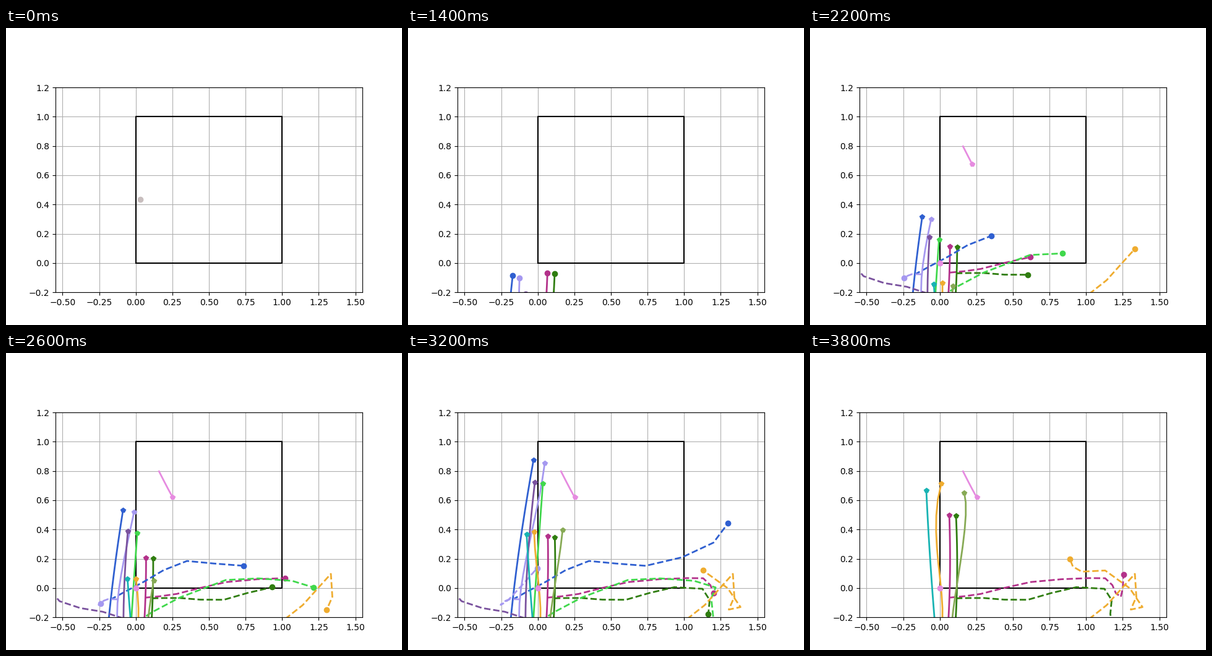
These frames come from a looping animation (640 by 480 pixels, 4000 ms). A matplotlib script:

```python
import numpy as np
import matplotlib.pyplot as plt
from matplotlib.animation import FuncAnimation

FRAMES, STEP_MS = 20, 200
SPLIT = 7  # last observed step; predictions branch off here


def curve(keys, steps):
    """Polynomial through (step, x, y) keys, at rest after the last one."""
    t, *xy = np.array(keys, dtype=float).T
    s = np.minimum(steps, t[-1]) - t[0]
    return np.column_stack([np.polyval(np.polyfit(t - t[0], v, len(t) - 1), s)
                            for v in xy])


def spline(keys, steps):
    """Smooth Hermite path through (step, x, y) keys."""
    keys = np.array(keys, dtype=float)
    t, p = keys[:, 0], keys[:, 1:]
    slope = np.gradient(p, t, axis=0)
    i = np.clip(np.searchsorted(t, steps, side="right") - 1, 0, len(t) - 2)
    h = (t[i + 1] - t[i])[:, None]
    u = np.clip((steps - t[i])[:, None] / h, 0, 1)
    ease = u * u * (3 - 2 * u)
    return (p[i] + (p[i + 1] - p[i]) * ease
            + h * u * (1 - u) * (slope[i] * (1 - u) - slope[i + 1] * u))


class Walker:
    """A solid walked path, plus a dashed predicted one after SPLIT."""

    def __init__(self, ax, color, keys, guess=None, last=FRAMES - 1):
        self.first, self.last = keys[0][0], last
        self.path = curve(keys, np.arange(self.first, last + 1))
        self.guess = spline(guess, np.arange(SPLIT, last + 1)) if guess else None
        self.line, = ax.plot([], [], "-", color=color, lw=2)
        self.dash, = ax.plot([], [], "--", color=color, lw=2)
        self.head, = ax.plot([], [], "p", color=color)
        self.dot, = ax.plot([], [], "o", color=color)
        self.artists = [self.line, self.dash, self.head, self.dot]

    def show(self, step):
        for artist in self.artists:
            artist.set_data([], [])
        if not self.first <= step <= self.last:
            return
        path = self.path[:step - self.first + 1]
        self.line.set_data(*path.T)
        tip = self.dot if step <= SPLIT else self.head
        tip.set_data(*path[-1:].T)
        if step > SPLIT and self.guess is not None:
            guess = self.guess[:step - SPLIT + 1]
            self.dash.set_data(*guess.T)
            self.dot.set_data(*guess[-1:].T)


fig, ax = plt.subplots(figsize=(6.4, 4.8), dpi=100)
fig.subplots_adjust(left=0.125, right=0.9, bottom=0.11, top=0.8)
half = 0.7 * 496 / 331.2  # equal scale on both axes
ax.set_xlim(0.5 - half, 0.5 + half)
ax.set_ylim(-0.2, 1.2)
ax.grid(True)
ax.plot([0, 0, 1, 1, 0], [0, 1, 1, 0, 0], color="black", lw=1.5)

walkers = [
    Walker(ax, "#c8bebe", [(0, .03, .435), (2, .028, .663), (4, .05, .865)],
           last=4),
    Walker(ax, "#b3318a", [(4, .06, -.2), (11, .07, .115), (19, .065, .5)],
           [(7, .069, -.065), (9, .28, -.04), (11, .62, .041), (13, 1.02, .068),
            (14, 1.13, .067), (16, 1.203, -.035), (17, 1.237, -.06),
            (19, 1.255, .091)]),
    Walker(ax, "#2f7d0f", [(4, .109, -.205), (11, .119, .11), (19, .111, .495)],
           [(7, .111, -.07), (9, .3, -.068), (11, .602, -.08), (13, .933, .006),
            (14, 1.125, -.005), (16, 1.165, -.178), (19, 1.2, -.35)]),
    Walker(ax, "#2f5fd0", [(5, -.19, -.27), (11, -.12, .315), (16, -.029, .875)],
           [(7, -.175, -.08), (9, .05, .04), (11, .35, .185), (13, .737, .152),
            (15, 1.2, .31), (16, 1.3, .443)], last=16),
    Walker(ax, "#a598f0", [(5, -.122, -.27), (9, -.1, .09), (12, -.035, .41),
                           (16, .048, .855)],
           [(7, -.124, -.077), (9, -.19, -.076), (13, -.24, -.108),
            (14, -.2, -.08), (16, -.005, .135)], last=16),
    Walker(ax, "#7a529e", [(6, -.084, -.3), (11, -.07, .177), (16, -.02, .722)],
           [(7, -.083, -.208), (8, -.225, -.162), (10, -.52, -.09),
            (11, -.62, .02)], last=16),
    Walker(ax, "#40d84c", [(7, -.033, -.26), (11, -.005, .16), (16, .035, .712)],
           [(7, -.033, -.26), (9, .3, -.065), (10, .615, .055), (11, .838, .066),
            (13, 1.215, .004), (14, 1.185, -.07), (16, 1.23, -.35)], last=16),
    Walker(ax, "#17b3b3", [(10, -.033, -.245), (15, -.07, .265),
                           (19, -.092, .667)]),
    Walker(ax, "#efac2f", [(10, .018, -.23), (13, .002, .062), (16, -.025, .385),
                           (19, .01, .712)],
           [(7, .6, -.45), (10, 1.14, -.117), (11, 1.333, .097),
            (12, 1.343, -.06), (13, 1.305, -.147), (14, 1.385, -.13),
            (16, 1.13, .12), (17, .97, .112), (19, .889, .198)]),
    Walker(ax, "#87aa55", [(10, .083, -.235), (13, .122, .052), (16, .17, .397),
                           (19, .167, .652)]),
    Walker(ax, "#e68be0", [(9, .159, .797), (11, .222, .675), (14, .254, .623)],
           [(7, 0, 0), (8, 0, 0)]),
]


def draw(step):
    for walker in walkers:
        walker.show(step)
    return [a for w in walkers for a in w.artists]


anim = FuncAnimation(fig, draw, frames=FRAMES, interval=STEP_MS,
                     repeat=True, repeat_delay=0, blit=False)
plt.show()
```
